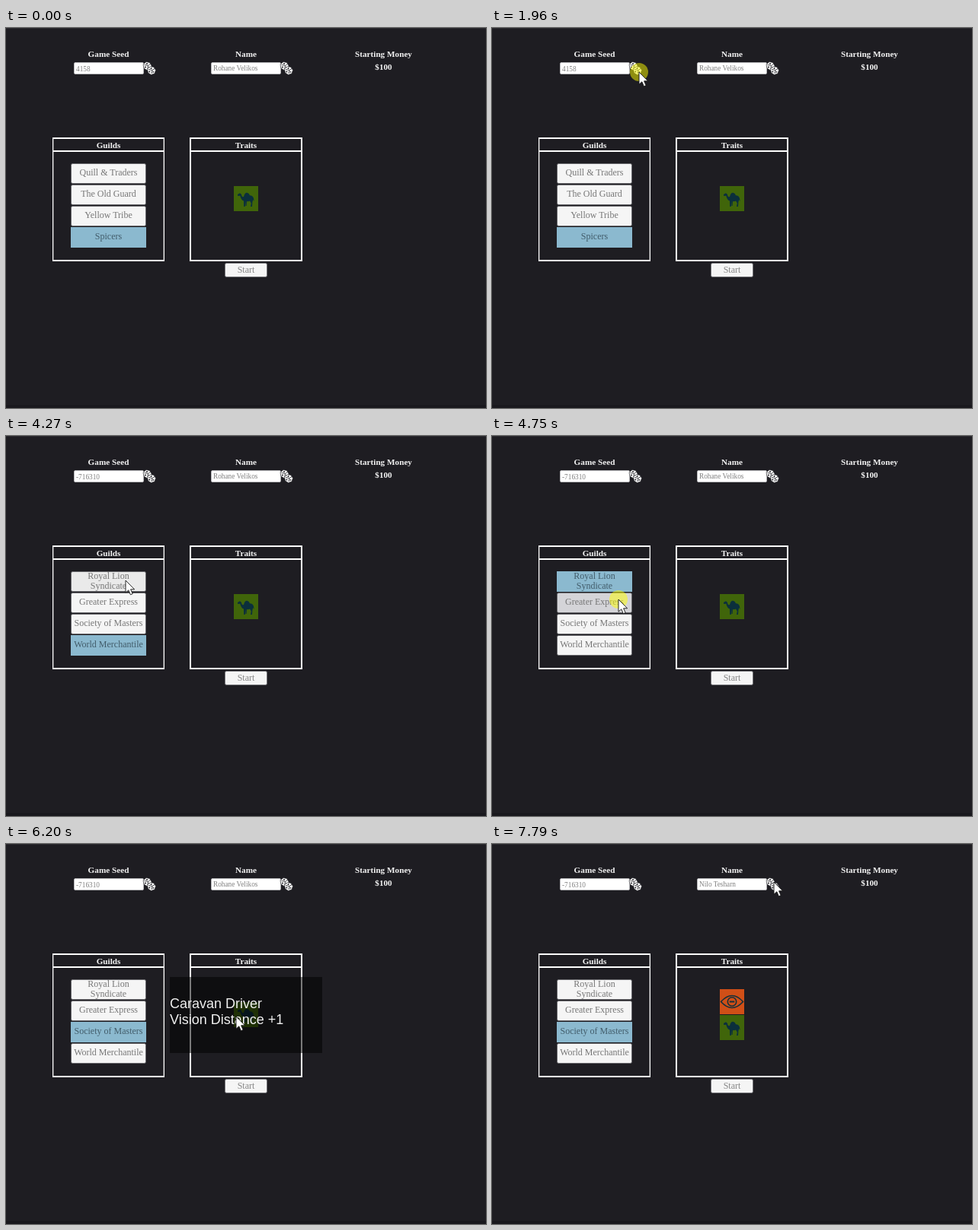
An HTML page that plays this animation: 630x500 px, repeating every 8000 ms.

```html
<!DOCTYPE html>
<html lang="en">
<head>
<meta charset="utf-8">
<title>New game setup</title>
<style>
  html, body { margin: 0; width: 100%; height: 100%; overflow: hidden; background: #1e1d22; }
  svg { display: block; }
  text { font: 12px "Liberation Serif", serif; fill: #777; }
  .mid { text-anchor: middle; }
  .head { font-size: 11.2px; font-weight: bold; fill: #f2f2f2; }
  .field { font-size: 9.3px; fill: #808080; }
  .tip { font: 18px "Liberation Sans", sans-serif; fill: #f0f0f0; }
</style>
</head>
<body>
<svg width="630" height="500" viewBox="0 0 630 500">
  <defs>
    <g id="die">
      <path d="M-1.5-5.5 3-4.5 5.5-.5 4 4-.5 5.5-4.5 3-5.5-2Z" fill="#fff" stroke="#1e1d22" stroke-width=".6"/>
      <path d="M-4-1.5 1-.5 4-2.5M1-.5 0 4" fill="none" stroke="#1e1d22" stroke-width=".8"/>
      <g fill="#1e1d22">
        <circle cx="-.5" cy="-3" r="1"/><circle cx="-2.6" cy="1.5" r="1"/><circle cx="2.4" cy="1.8" r=".9"/>
      </g>
    </g>
    <g id="dice"><use href="#die" x="5.5" y="5.5"/><use href="#die" x="11" y="11.5"/></g>
    <g id="camel">
      <rect width="32" height="33" fill="#40650a"/>
      <path fill="#0b2f3c" d="M5 11 8 9.3 10 11Q10.5 15 13 14 14.5 8 18 9 20 9.5 21 12.3 25 12.5 26 16L26.6 20 25.3 18 24.4 21 24 27H22L22.8 22.5 21 19.5Q19 20.5 17 20L16.6 26H15.5L15.4 20 14.8 27H13.2L13 19.5Q9.5 18.5 8.3 12.8L5.2 13Z"/>
    </g>
    <g id="eye">
      <rect width="32" height="33" fill="#d04f17"/>
      <g fill="none" stroke="#14303a" stroke-width="1.6">
        <path d="M1.5 16.5Q16 .5 30.5 16.5 16 32.5 1.5 16.5Z"/>
        <circle cx="16" cy="16.5" r="5.7"/>
        <path d="M12.8 16.5H19.2" stroke-width="2"/>
      </g>
    </g>
  </defs>
  <rect width="630" height="500" fill="#1e1d22"/>
  <rect width="630" height="1" fill="#2b2a2f"/>
  <rect y="496" width="630" height="4" fill="#19181d"/>
  <g id="layout"></g>
  <g id="guilds"></g>
  <g id="traits"></g>
  <text id="seed" class="field" x="92" y="56.5"></text>
  <text id="name" class="field" x="272" y="56.2"></text>
  <g id="tooltip">
    <rect x="215" y="175" width="200" height="100" fill="#000" fill-opacity=".52"/>
    <text class="tip" x="215" y="216">Caravan Driver</text>
    <text class="tip" x="215" y="237">Vision Distance +1</text>
  </g>
  <circle id="press" r="12" fill="#ff0" fill-opacity=".5"/>
  <path id="cursor" d="M0 0V16.2L3.8 12.8 6.4 18.8 9.2 17.6 6.6 11.8H11.6Z" fill="#fff" stroke="#111" stroke-width=".9"/>
</svg>
<script>
const LOOP = 8000, FADE = 180;
const $ = id => document.getElementById(id);

// Each roll of the seed replaces the guild list; its last guild starts selected.
const rolls = [
  [0, "4158", ["Quill &amp; Traders", "The Old Guard", "Yellow Tribe", "Spicers"]],
  [1990, "862417", ["Greater Tribe", "Society of Spice", "Royal Cartel"]],
  [2480, "-304952", ["Quill Express", "Yellow Guard", "World Traders", "The Old Clan"]],
  [2740, "-579079", ["The Old Guard", "Yellow Cartel", "Collegium of Clan"]],
  [3530, "-716310", ["Royal Lion|Syndicate", "Greater Express", "Society of Masters", "World Merchantile"]]
];
const picks = [[4390, 0], [4760, 1], [5110, 2]];
const rename = 7740;
const presses = [
  [1770, 1990], [2270, 2480], [2540, 2740], [3320, 3530],
  [4330, 4390], [4700, 4760], [5050, 5110], [7580, rename]
];
const path = [
  [920, 622, 98], [1060, 520, 80], [1240, 370, 56], [1420, 215, 40], [1550, 193, 58],
  [3550, 193, 58], [3650, 200, 74], [3800, 192, 95], [3980, 170, 155], [4110, 157, 190],
  [4480, 157, 190], [4560, 178, 202], [4640, 166, 215],
  [4860, 166, 215], [5020, 165, 243],
  [5670, 165, 243], [5820, 205, 242], [6020, 285, 232], [6200, 302, 227], [6450, 306, 226],
  [6750, 306, 226], [6900, 318, 200], [7200, 352, 112], [7400, 372, 60], [7550, 370, 50]
];

const latest = (list, t) => list.filter(e => e[0] <= t).pop();
const mix = (a, b, k) => `rgb(${a.map((v, i) => Math.round(v + (b[i] - v) * k))})`;
const label = (x, y, s, cls = "", fill = "") =>
  `<text class="mid ${cls}" x="${x}" y="${y}"${fill && ` style="fill:${fill}"`}>${s}</text>`;

function panel(x, w, side, title) {
  const inner = `x="${x + side}" width="${w - 2 * side}" fill="#1e1d22"`;
  return `<rect x="${x}" y="144" width="${w}" height="163" fill="#fff"/>
    <rect ${inner} y="146" height="15"/><rect ${inner} y="163" height="142"/>` +
    label(x + w / 2, 157.5, title, "head");
}

const field = x =>
  `<rect x="${x + .5}" y="45.5" width="91" height="15" rx="1.5" fill="#fff" stroke="#b5b5b8"/>
   <use href="#dice" x="${x + 91}" y="44.5"/>`;

const box = (x, y, w, h, fill, edge) =>
  `<rect x="${x + .5}" y="${y + .5}" width="${w - 1}" height="${h - 1}" rx="${edge ? 2 : 0}" fill="${fill}" stroke="${edge || fill}"/>`;

$("layout").innerHTML =
  label(134.5, 38, "Game Seed", "head") + label(315, 38, "Name", "head") +
  label(495.5, 38, "Starting Money", "head") + label(495.5, 55, "$100", "head") +
  field(89) + field(269) +
  panel(61, 147, 1.3, "Guilds") + panel(241, 148, 2, "Traits") +
  box(287, 309, 56, 19, "#f5f5f5", "#77777b") + label(315, 322, "Start", "", "#858585");

const LIGHT = [245, 245, 245], HOVER = [234, 234, 234], DOWN = [212, 212, 216], BLUE = [139, 185, 207];

function guildButtons(t, names, rollTime, point, down) {
  const past = picks.filter(p => p[0] <= t && p[0] > rollTime);
  const [since, chosen] = past.pop() || [rollTime - FADE, names.length - 1];
  const before = past.length ? past.pop()[1] : names.length - 1;
  const k = Math.min(1, (t - since) / FADE);
  return names.map((name, i) => {
    const y = 234 - 14 * names.length + 28 * i;
    const hover = point && point[0] > 85 && point[0] < 184 && point[1] > y && point[1] < y + 27;
    const level = i === chosen ? k : i === before ? 1 - k : 0;
    const base = hover && (down || level > 0) ? DOWN : hover ? HOVER : LIGHT;
    const ink = mix([119, 119, 119], [66, 92, 106], level);
    const lines = name.split("|");
    return box(85, y, 99, 27, mix(base, BLUE, level), level === 1 ? "" : mix([105, 105, 109], BLUE, level)) +
      lines.map((s, n) => label(134.5, y + (lines.length > 1 ? 10 + 12.5 * n : 16.3), s, "", ink)).join("");
  }).join("");
}

function cursorAt(t) {
  if (t < path[0][0]) return null;
  const i = path.findIndex(p => p[0] > t);
  if (i < 0) return path[path.length - 1].slice(1);
  const [t0, x0, y0] = path[i - 1], [t1, x1, y1] = path[i];
  const k = (t - t0) / (t1 - t0);
  return [x0 + (x1 - x0) * k, y0 + (y1 - y0) * k];
}

const shown = {};
function setHTML(id, html) {
  if (shown[id] !== html) $(id).innerHTML = shown[id] = html;
}

function place(id, visible, point) {
  $(id).style.display = visible ? "" : "none";
  if (visible && point) $(id).setAttribute("transform", `translate(${point})`);
}

function draw(t) {
  const [rollTime, seed, names] = latest(rolls, t);
  const point = cursorAt(t);
  const down = presses.some(([a, b]) => t >= a && t < b);
  const renamed = t >= rename;

  setHTML("seed", seed);
  setHTML("name", renamed ? "Nilo Tesharn" : "Rohane Velikos");
  setHTML("guilds", guildButtons(t, names, rollTime, point, down));
  setHTML("traits", renamed
    ? '<use href="#eye" x="299" y="191"/><use href="#camel" x="299" y="225"/>'
    : '<use href="#camel" x="299" y="208"/>');

  place("tooltip", point && point[0] > 299 && point[0] < 331 && point[1] > 208 && point[1] < 241);
  place("press", down, point);
  place("cursor", !!point, point);
}

const start = performance.now();
function tick() {
  draw((performance.now() - start) % LOOP);
  requestAnimationFrame(tick);
}
tick();
</script>
</body>
</html>
```
